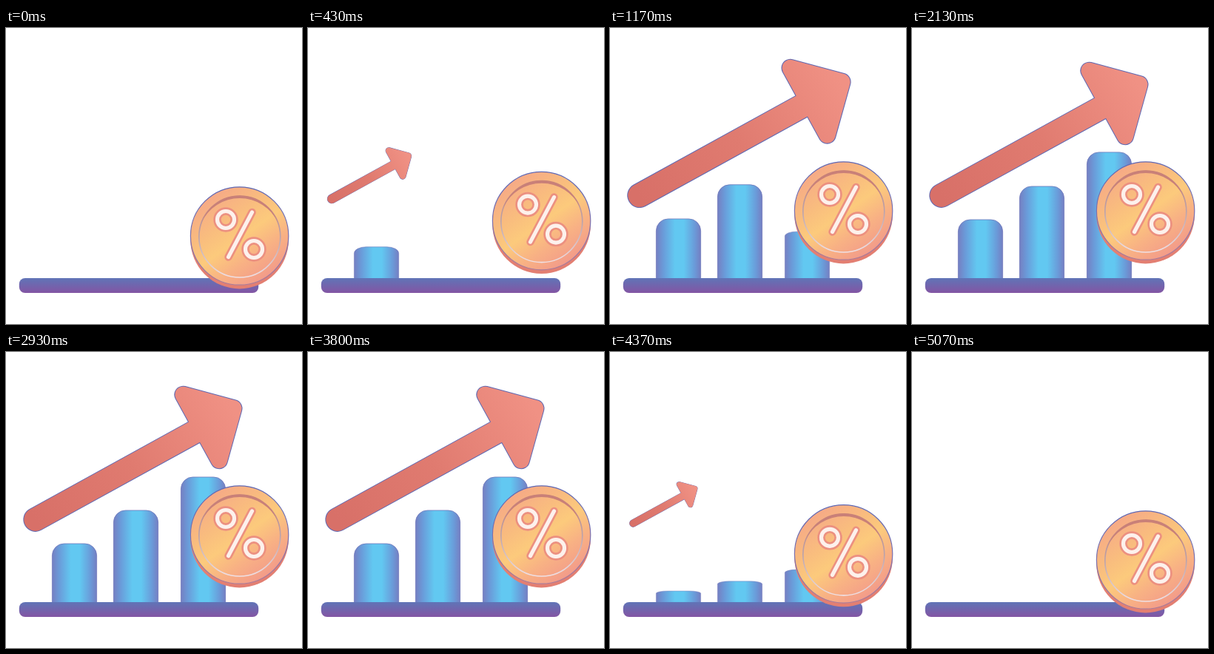
An HTML page for the animation above (5.11 s loop, 400 by 400 pixels).

```html
<!DOCTYPE html>
<html lang="en">
<head>
<meta charset="utf-8">
<title>Growth chart</title>
<style>
  html, body { margin: 0; width: 100%; height: 100%; overflow: hidden; background: #fff; }
  svg { display: block; width: 100%; height: 100%; }
</style>
</head>
<body>
<svg viewBox="0 0 400 400">
  <defs>
    <linearGradient id="baseFill" x2="0" y2="1">
      <stop stop-color="#6074b7"/>
      <stop offset="1" stop-color="#8355a3"/>
    </linearGradient>
    <linearGradient id="barFill">
      <stop stop-color="#757fc2"/>
      <stop offset=".16" stop-color="#6a9bd9"/>
      <stop offset=".42" stop-color="#62c8f1"/>
      <stop offset=".62" stop-color="#62c8f1"/>
      <stop offset=".86" stop-color="#6a9bd9"/>
      <stop offset="1" stop-color="#757fc2"/>
    </linearGradient>
    <linearGradient id="arrowFill" gradientUnits="userSpaceOnUse" x1="40" y1="228" x2="305" y2="75">
      <stop stop-color="#d87068"/>
      <stop offset=".5" stop-color="#e07b70"/>
      <stop offset="1" stop-color="#f09184"/>
    </linearGradient>
    <linearGradient id="faceFill" x1=".2" y1=".1" x2=".8" y2=".95">
      <stop stop-color="#f6aa86"/>
      <stop offset=".3" stop-color="#f9bd7e"/>
      <stop offset=".5" stop-color="#fcca7c"/>
      <stop offset=".72" stop-color="#f8b184"/>
      <stop offset="1" stop-color="#f2988a"/>
    </linearGradient>
    <linearGradient id="ringLine" x2="0" y2="1">
      <stop stop-color="#c58078"/>
      <stop offset=".5" stop-color="#b9a2ac"/>
      <stop offset="1" stop-color="#efe0e4"/>
    </linearGradient>
    <linearGradient id="edgeLine" x2="0" y2="1">
      <stop stop-color="#5f68b4"/>
      <stop offset=".6" stop-color="#7f72ae"/>
      <stop offset="1" stop-color="#a87c9c"/>
    </linearGradient>
    <g id="arrowShape" stroke-linecap="round" stroke-linejoin="round">
      <path d="M39.8 226.4L262 104.2" stroke-width="33"/>
      <path d="M239.3 57.7L307.5 76.2L288 146.2Z" stroke-width="24"/>
    </g>
    <g id="percent" fill="none" stroke-linecap="round">
      <circle cx="297" cy="225" r="11.5"/>
      <circle cx="335" cy="265" r="11.5"/>
      <path d="M332.5 215L300.5 275.5"/>
    </g>
  </defs>

  <g id="bars" fill="url(#barFill)" stroke="#6f78ba" stroke-width=".8"></g>
  <rect x="17.8" y="338" width="323.4" height="20" rx="8" fill="url(#baseFill)"/>

  <g id="arrow">
    <use href="#arrowShape" fill="#5f68b2" stroke="#5f68b2"/>
    <g stroke-linecap="round" stroke-linejoin="round" fill="url(#arrowFill)" stroke="url(#arrowFill)">
      <path d="M39.8 226.4L262 104.2" stroke-width="31"/>
      <path d="M239.3 57.7L307.5 76.2L288 146.2Z" stroke-width="22"/>
    </g>
  </g>

  <g id="coin">
    <circle cx="315.6" cy="252" r="66.4" fill="#e37f72"/>
    <circle cx="315.6" cy="247" r="66.2" fill="url(#faceFill)" stroke="url(#edgeLine)" stroke-width="1.2"/>
    <circle cx="315.8" cy="248" r="55" fill="none" stroke="url(#ringLine)" stroke-width="1.6"/>
    <path d="M264 229A55 55 0 0 1 367.6 229A57.2 57.2 0 0 0 264 229Z" fill="#c98078"/>
    <use href="#percent" stroke="#ec9080" stroke-width="10.5"/>
    <use href="#percent" stroke="#fdf1ec" stroke-width="5.2"/>
  </g>
</svg>
<script>
  const LOOP = 5110, EXIT = 3820, FLOOR = 338, DROP = 34;
  const PIVOT = { x: 27.4, y: 233.8 };
  const arrow = document.getElementById('arrow');
  const coin = document.getElementById('coin');
  const barGroup = document.getElementById('bars');

  const ramp = (t, start, length) => Math.min(1, Math.max(0, (t - start) / length));
  const smooth = (t, start, length) => {
    const u = ramp(t, start, length);
    return u * u * (3 - 2 * u);
  };

  const bars = [
    { x: 62, top: 259, start: 20, exit: 764 },
    { x: 145, top: 214, start: 410, exit: 797 },
    { x: 236, top: 169, start: 845, exit: 827 }
  ].map(bar => {
    const node = document.createElementNS('http://www.w3.org/2000/svg', 'path');
    node.setAttribute('d', `M${bar.x + .4} ${FLOOR + 2}V${bar.top + 16}a16 16 0 0 1 16-16h28.2a16 16 0 0 1 16 16V${FLOOR + 2}Z`);
    barGroup.append(node);
    return { ...bar, node };
  });

  // Rise slightly past full size, settle, then shrink away.
  const size = (rise, settle, exit, extra) => (rise * (1 + extra) - settle * extra) * (1 - exit);

  function place(node, s, x, y, sx) {
    node.setAttribute('visibility', s > .004 ? 'visible' : 'hidden');
    node.setAttribute('transform', `translate(${x} ${y}) scale(${sx} ${s}) translate(${-x} ${-y})`);
  }

  function draw(t) {
    for (const { node, start, exit } of bars) {
      const s = size(smooth(t, start, 800), smooth(t, start + 800, 730), smooth(t, EXIT, exit), .025);
      place(node, s, 0, FLOOR, 1);
    }
    const s = size(ramp(t, 0, 1140), smooth(t, 1170, 730), smooth(t, EXIT, 877), .021);
    place(arrow, s, PIVOT.x, PIVOT.y, s);

    const lift = smooth(t, 0, 760) - smooth(t, EXIT, 809);
    coin.setAttribute('transform', `translate(0 ${DROP * (1 - lift)})`);
  }

  const begin = performance.now();
  function tick() {
    draw((performance.now() - begin) % LOOP);
    requestAnimationFrame(tick);
  }
  tick();
</script>
</body>
</html>
```
